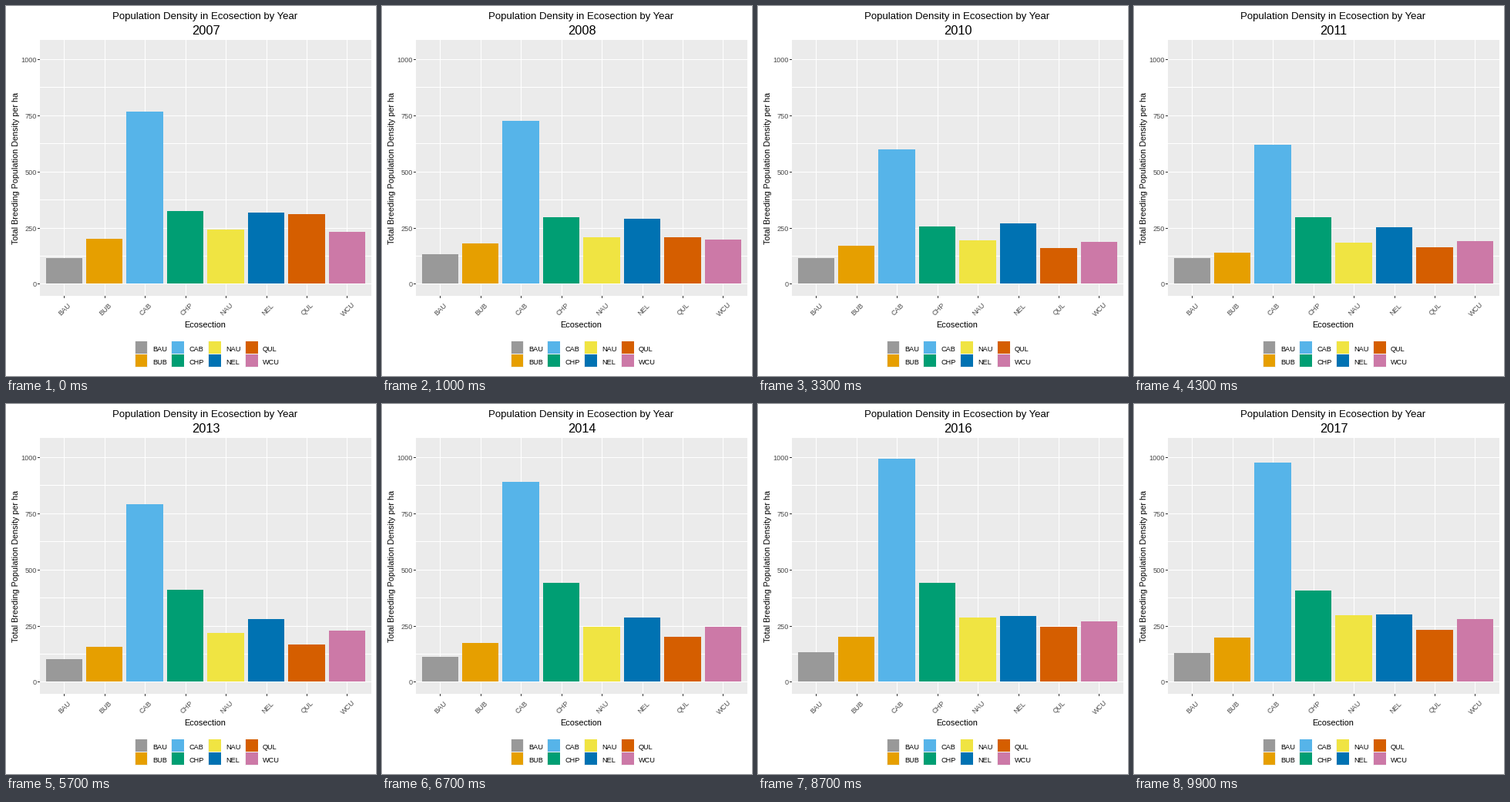
Animation of 480x480 px, one loop 10000 ms. Source, as a matplotlib script:

```python
import numpy as np
import matplotlib.pyplot as plt
from matplotlib.animation import FuncAnimation
from matplotlib.patches import Rectangle

plt.rcParams["font.family"] = "Liberation Sans"

SIZE, DPI, FRAMES = 480, 100, 100
LEFT, RIGHT, TOP, BOTTOM = 44, 474, 44, 376
FIRST_YEAR, LAST_YEAR = 2007, 2017
BAR_BASE = 360

# Colour and density at the key years; linear in between
KEY_YEARS = [2007, 2008, 2009, 2011, 2013, 2015, 2017]
SECTIONS = {
    "BAU": ("#999999", [116, 133, 109, 119, 100, 136, 130]),
    "BUB": ("#E69F00", [202, 182, 237, 136, 160, 202, 199]),
    "CAB": ("#56B4E9", [769, 728, 645, 580, 822, 1008, 978]),
    "CHP": ("#009E73", [326, 298, 228, 271, 430, 466, 408]),
    "NAU": ("#F0E442", [243, 209, 229, 177, 225, 280, 298]),
    "NEL": ("#0072B2", [319, 291, 312, 248, 286, 288, 302]),
    "QUL": ("#D55E00", [312, 209, 161, 163, 169, 257, 234]),
    "WCU": ("#CC79A7", [233, 199, 197, 183, 236, 265, 281]),
}

fig = plt.figure(figsize=(SIZE / DPI, SIZE / DPI), dpi=DPI, facecolor="white")
ax = fig.add_axes([0, 0, 1, 1])
ax.set_xlim(0, SIZE)
ax.set_ylim(SIZE, 0)
ax.axis("off")


def rect(x0, y0, x1, y1, color, z=1):
    patch = Rectangle((x0, y0), x1 - x0, y1 - y0, facecolor=color,
                      linewidth=0, antialiased=False, zorder=z)
    return ax.add_patch(patch)


def text(x, y, label, px, color="black", ha="center", va="baseline", **kw):
    return ax.text(x, y, label, fontsize=px * 72 / DPI, color=color,
                   ha=ha, va=va, zorder=5, **kw)


def x_pos(slot):
    return 43.65 + 52.48 * (slot + 0.6)


def y_pos(value):
    return 360.83 - 0.29125 * value


def draw_y_axis():
    for value in range(0, 1001, 125):
        y = int(y_pos(value))
        rect(LEFT, y, RIGHT, y + 1, "white")
        if value % 250 == 0:
            rect(LEFT - 3, y, LEFT, y + 1, "#333333")
            text(39.8, y + 4, str(value), 9.2, "#4D4D4D", "right")


def draw_x_tick(slot, name):
    x = round(x_pos(slot))
    rect(x, TOP, x + 1, BOTTOM, "white")
    rect(x, BOTTOM, x + 1, BOTTOM + 3, "#333333")
    text(x + 1.5, 393.5, name, 9.1, "#4D4D4D", va="center", rotation=45)


def draw_key(slot, name, color):
    col, row = divmod(slot, 2)
    x, y = int(168 + 47.7 * col), 435 + 17 * row
    rect(x - 1, y, x + 16, y + 17, "#F2F2F2")
    rect(x, y, x + 16 - (col == 0), y + 16, color, 2)
    text(x + 22, y + 13, name, 9.1, ha="left")


rect(LEFT, TOP, RIGHT, BOTTOM, "#EBEBEB", 0)
draw_y_axis()
bars = []
for slot, (name, (color, _)) in enumerate(SECTIONS.items()):
    draw_x_tick(slot, name)
    draw_key(slot, name, color)
    bars.append(rect(round(x_pos(slot - 0.45)), BAR_BASE - 1,
                     round(x_pos(slot + 0.45)), BAR_BASE, color, 3))

text(258.5, 17, "Population Density in Ecosection by Year", 13.2)
year_label = text(259, 37, "", 16.4)
text(258.5, 417, "Ecosection", 11)
text(18.5, 210.5, "Total Breeding Population Density per ha", 10.8,
     ha="right", va="center", rotation=90)


def update(k):
    year = FIRST_YEAR + (LAST_YEAR - FIRST_YEAR) * k / (FRAMES - 1)
    for bar, (_, series) in zip(bars, SECTIONS.values()):
        top = round(y_pos(np.interp(year, KEY_YEARS, series)))
        bar.set_y(top)
        bar.set_height(BAR_BASE - top)
    year_label.set_text(str(round(year)))
    return [*bars, year_label]


anim = FuncAnimation(fig, update, frames=FRAMES, interval=100,
                     repeat=True, repeat_delay=0)
plt.show()
```
